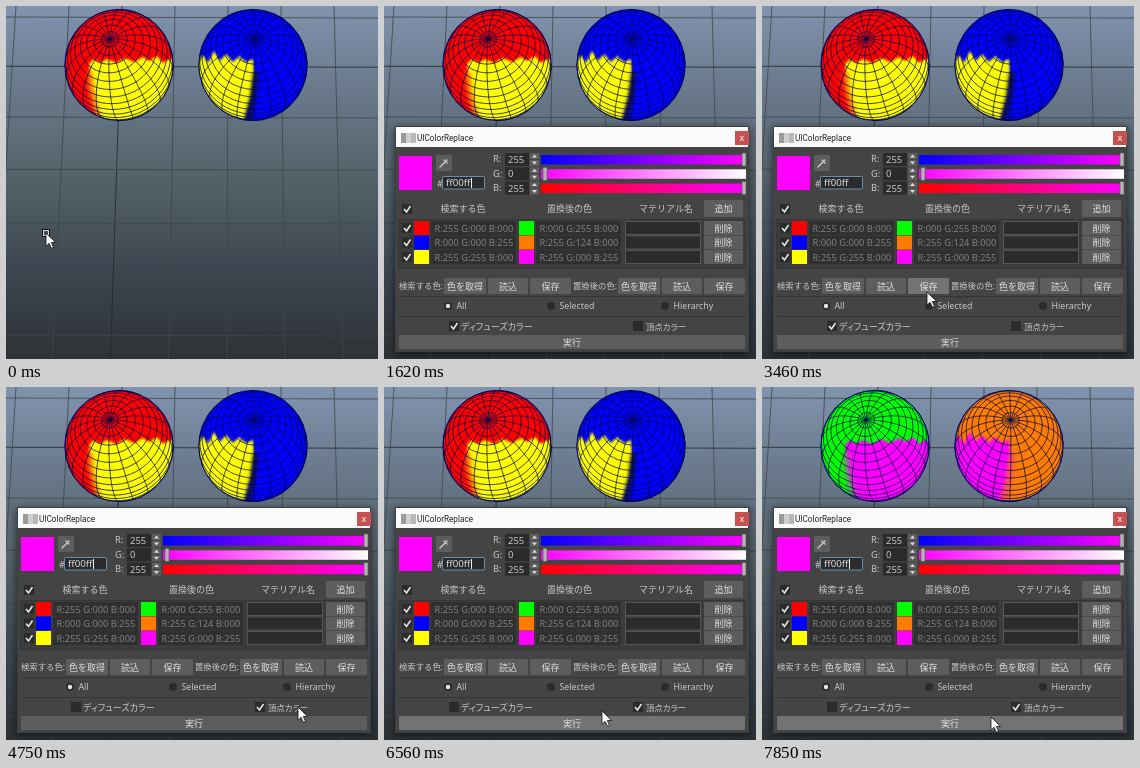
These frames come from a looping animation (372x353 px, 8 s). An HTML page:

```html
<!DOCTYPE html>
<html lang="ja">
<head>
<meta charset="utf-8">
<title>UIColorReplace</title>
<style>
html, body { margin: 0; width: 100%; height: 100%; overflow: hidden; background: #2d3235; }
svg { display: block; width: 372px; height: 353px; }
text { font-family: "Noto Sans", "Noto Sans CJK JP", "Noto Sans CJK", sans-serif; white-space: pre; }
.kana { font-feature-settings: "palt"; }
</style>
</head>
<body>
<svg id="stage" viewBox="0 0 372 353" xmlns="http://www.w3.org/2000/svg"></svg>
<script>
const LOOP = 8000;
const rect = (x, y, w, h, fill, more = '') =>
  `<rect x="${x}" y="${y}" width="${w}" height="${h}" fill="${fill}" ${more}/>`;
const text = (x, y, str, size = 9, fill = '#c8c8c8', more = '') =>
  `<text x="${x}" y="${y}" font-size="${size}" fill="${fill}" ${more}>${str}</text>`;
const path = (d, more) => `<path d="${d}" ${more}/>`;
const line = (x1, y1, x2, y2, stroke) => path(`M${x1} ${y1}L${x2} ${y2}`, `stroke="${stroke}" fill="none"`);
const range = n => [...Array(n).keys()];

const gradient = (id, stops, vertical) =>
  `<linearGradient id="${id}" x2="${vertical ? 0 : 1}" y2="${vertical ? 1 : 0}">` +
  stops.map(([o, c]) => `<stop offset="${o}" stop-color="${c}"/>`).join('') + '</linearGradient>';
const blur = (id, amount) =>
  `<filter id="${id}" x="-50%" y="-20%" width="200%" height="140%" color-interpolation-filters="sRGB">` +
  `<feGaussianBlur stdDeviation="${amount}"/></filter>`;

function viewport() {
  const shade = (i, axis) => i === axis ? '#23262b' : '#41454a';
  const columns = range(7).map(i => line(10 + 53 * i, 0, -12 + 58.2 * i, 353, shade(i, 2)));
  const rows = range(7).map(i => {
    const y = 11 + 48.5 * i + .75 * i * i;
    return line(0, y, 372, y + 1, shade(i, 1));
  });
  return rect(0, 0, 372, 353, 'url(#sky)') + `<g opacity=".8">${columns.join('') + rows.join('')}</g>`;
}

// Latitude and longitude lines of the near half, tilted so the pole sits at (ax, ay).
function wireframe(cx, cy, ax, ay) {
  const az = Math.sqrt(1 - ax * ax - ay * ay), m = Math.hypot(ax, az);
  const u = [az / m, 0, -ax / m];
  const v = [-ax * ay / m, m, -ay * az / m];
  const trace = at => {
    let d = '', pen = 'M';
    for (let i = 0; i <= 60; i++) {
      const [lat, lon] = at(i / 60);
      const s = Math.sin(lat), p = s * Math.cos(lon), q = s * Math.sin(lon), c = Math.cos(lat);
      if (p * u[2] + q * v[2] + c * az < 0) { pen = 'M'; continue; }
      const x = cx + 54.2 * (p * u[0] + q * v[0] + c * ax);
      const y = cy - 55.6 * (p * u[1] + q * v[1] + c * ay);
      d += pen + x.toFixed(1) + ' ' + y.toFixed(1);
      pen = 'L';
    }
    return d;
  };
  const step = Math.PI / 20;
  return range(19).map(i => trace(k => [(i + 1) * step, k * 2 * Math.PI])).join('') +
    range(20).map(i => trace(k => [k * Math.PI, i * 2 * step])).join('');
}

function sphere(name, cx, ax, base, patch, seam, blend) {
  const shape = `cx="${cx}" cy="59" rx="54.2" ry="55.6"`;
  return `<clipPath id="${name}Clip"><ellipse ${shape}/></clipPath>
    <g clip-path="url(#${name}Clip)">
      <ellipse id="${name}Base" ${shape} fill="${base}"/>
      ${path(patch, 'class="patch" fill="#ff0" filter="url(#soft)"')}
      ${path(seam, `id="${name}Seam" fill="none" stroke="${blend}" stroke-width="5" filter="url(#wide)"`)}
    </g>` +
    path(wireframe(cx, 59, ax, .468), 'fill="none" stroke="#00084a" stroke-width=".75"') +
    `<ellipse ${shape} fill="none" stroke="#000868"/>`;
}

const check = (x, y, id, on = true) => rect(x, y, 10, 10, '#2b2b2b') +
  path(`M${x + 2} ${y + 5}l2.5 3l4 -6`,
    `${id ? `id="${id}"` : ''} fill="none" stroke="#e6e6e6" stroke-width="1.6" opacity="${on ? 1 : 0}"`);

const button = (x, y, w, h, label, id = '') => rect(x, y, w, h, '#5d5d5d', `rx="1" ${id && `id="${id}"`}`) +
  text(x + w / 2, y + h / 2 + 3.5, label, 9, '#e0e0e0', 'text-anchor="middle"');

function channel(y, label, value, knob) {
  return text(109, y + 9.3, label, 9.3) + rect(121, y, 24, 13, '#2b2b2b') + text(124, y + 10, value, 9.5) +
    rect(146, y, 9, 6, '#5d5d5d') + rect(146, y + 7, 9, 6, '#5d5d5d') +
    path(`M148 ${y + 4.5}l2.5 -3l2.5 3zM148 ${y + 8.5}l2.5 3l2.5 -3z`, 'fill="#ddd"') +
    rect(157, y + 2, 205, 9.5, `url(#ch${label[0]})`) +
    rect(knob, y, 4, 13, '#b4b4b4', 'stroke="#555" stroke-width=".6"');
}

function colorRow(y, from, fromText, to, toText) {
  const cell = (x, str) => rect(x, y, 85, 14, '#303030') + text(x + 3.5, y + 10.5, str, 9.3, '#808080');
  return check(18, y + 2) + rect(30, y, 15, 14, from) + cell(47, fromText) +
    rect(135, y, 15, 14, to) + cell(152, toText) +
    rect(241.5, y + .5, 75, 13, '#2b2b2b', 'stroke="#555"') + button(320, y, 39, 14, '削除');
}

const radio = (x, label, on) => `<circle cx="${x}" cy="300" r="4" fill="#2b2b2b"/>` +
  (on ? `<circle cx="${x}" cy="300" r="2.2" fill="#e6e6e6"/>` : '') + text(x + 8.5, 303.2, label, 8.8);

const fileButtons = (x, id) => button(x, 272, 42, 16, '色を取得') +
  button(x + 44, 272, 40, 16, '読込') + button(x + 86, 272, 41, 16, '保存', id);

function dialog() {
  const mosaic = range(6).map(i =>
    rect(17 + i % 3 * 5, 127 + (i > 2) * 5, 5, 5, ['#9a9a9a', '#b8b8b8', '#cfcfcf'][i * 2 % 3])).join('');
  return rect(10, 121, 356, 228, '#000', 'opacity=".5" filter="url(#shadow)"') +
    rect(11.5, 120.5, 353, 225, '#444', 'stroke="#3a3f44"') +
    rect(12, 121, 352, 20, '#fbfbfb') + mosaic +
    text(33, 135, 'UIColorReplace', 8.2, '#222', 'style="font-family:Roboto,sans-serif"') +
    rect(351, 125, 14, 14, '#c75050') + text(358, 135, 'x', 9, '#fff', 'text-anchor="middle"') +
    rect(15, 150, 33, 34, '#f0f') +
    rect(52, 149, 16, 16, '#5d5d5d', 'rx="1"') +
    path('M56 161l5 -5M60 154l3 3M62 155l1 -1', 'stroke="#c4c4c4" stroke-width="1.5" stroke-linecap="round"') +
    text(53, 181, '#', 9) +
    rect(58.5, 170.5, 42, 12.5, '#2b2b2b', 'stroke="#6a8fac" rx="1"') + text(62, 180.3, 'ff00ff', 9.7, '#ddd') +
    rect(87, 172, 1, 10, '#eee', 'id="caret"') +
    channel(147, 'R:', '255', 358) + channel(161.3, 'G:', '0', 159) + channel(175.6, 'B:', '255', 358) +
    check(18, 198) + text(56.5, 206, '検索する色') + text(163, 206, '置換後の色') + text(255, 206, 'マテリアル名') +
    button(320, 194, 39, 17, '追加') +
    rect(14.5, 213.5, 347, 49, '#3c3c3c', 'stroke="#363636"') +
    colorRow(215, '#f00', 'R:255 G:000 B:000', '#0f0', 'R:000 G:255 B:000') +
    colorRow(229.5, '#00f', 'R:000 G:000 B:255', '#ff7c00', 'R:255 G:124 B:000') +
    colorRow(244, '#ff0', 'R:255 G:255 B:000', '#f0f', 'R:255 G:000 B:255') +
    text(15, 283.3, '検索する色:', 8.4) + fileButtons(60, 'save') +
    text(189, 283.3, '置換後の色:', 8.4) + fileButtons(234, '') +
    line(15, 290.5, 361, 290.5, '#363636') + line(15, 310.5, 361, 310.5, '#363636') +
    radio(64, 'All', true) + radio(167, 'Selected') + radio(281, 'Hierarchy') +
    check(65, 315, 'diffuse') + text(77, 323.5, 'ディフューズカラー', 9, '#c8c8c8', 'class="kana"') +
    check(249, 315, 'vertex', false) + text(262, 323.5, '頂点カラー', 8.4, '#c8c8c8', 'class="kana"') +
    button(15, 329, 346, 14, '実行', 'run');
}

const arrow = path('M0 0V13.2L3.1 10.3L5.4 15.3L7.5 14.3L5.3 9.5H9.6Z',
  'fill="#fff" stroke="#111" stroke-width=".8"');

const stage = document.getElementById('stage');
stage.innerHTML = '<defs>' +
  gradient('sky', [[0, '#8194ae'], [.2, '#6d7d91'], [.5, '#536167'], [.75, '#3d4650'], [1, '#2d3235']], true) +
  gradient('chR', [[0, '#00f'], [1, '#f0f']]) + gradient('chG', [[0, '#f0f'], [1, '#fff']]) +
  gradient('chB', [[0, '#f00'], [1, '#f0f']]) +
  blur('soft', 1) + blur('wide', 2) + blur('shadow', 4) + '</defs>' +
  viewport() +
  sphere('left', 113, -.165, '#f00',
    'M83 58L88 53L94 57L101 53L110 57L119 52L128 56L137 51L143 55L151 50L157 57L163 53L172 55V120H95L89 100L85 82L84 68Z',
    'M84 66L85 82L89 100L95 120', '#ff8000') +
  sphere('right', 247, .03, '#00f',
    'M188 56L197 49L202 57L208 45L214 55L220 48L227 56L233 50L240 56L247 53L248 68L245 90L237 120H188Z',
    'M250 66L247 90L240 120', '#14141c') +
  `<g id="dialog">${dialog()}</g>
  <g id="pick"><g transform="translate(40 227)">
    ${rect(-3.5, -3.5, 7, 7, 'none', 'stroke="#111"')}
    ${rect(-2.5, -2.5, 5, 5, 'none', 'stroke="#ddd"')}${arrow}</g></g>
  <g id="pointer"><g id="pointerPos">${arrow}</g></g>`;

// Each step holds its value until the next one.
function play(target, prop, steps) {
  const frames = steps.map(([t, v]) => ({ offset: t / LOOP, [prop]: v, easing: 'steps(1, end)' }));
  frames.push({ offset: 1, [prop]: steps[steps.length - 1][1] });
  for (const el of document.querySelectorAll(target)) el.animate(frames, { duration: LOOP, iterations: Infinity });
}

const REST = '#5d5d5d', HOVER = '#737373', PRESSED = '#1e1e1e', DONE = 7730;
play('#pick', 'opacity', [[0, 1], [120, 0]]);
play('#dialog', 'opacity', [[0, 0], [1620, 1]]);
play('#pointer', 'opacity', [[0, 0], [2180, 1]]);
play('#pointerPos', 'transform', [
  [0, 310, 170], [2330, 304, 160], [2480, 296, 150], [2640, 284, 141], [2790, 270, 134], [2940, 261, 131],
  [3340, 200, 235], [3460, 165, 286], [3610, 150, 298], [3760, 120, 309], [3910, 92, 316], [4060, 74, 318],
  [4210, 69, 319], [4450, 190, 319], [4600, 286, 319], [4750, 292, 320], [4870, 285, 324], [5000, 265, 329],
  [5130, 245, 331], [5270, 232, 331], [5410, 227, 331], [6260, 223, 329], [6400, 220, 326], [6560, 218, 324],
  [6960, 221, 326], [7110, 225, 328], [7280, 228, 329], [7450, 229, 330]
].map(([t, x, y]) => [t, `translate(${x}px, ${y}px)`]));
play('#caret', 'opacity', [[0, 1], [2180, 0], [2790, 1], [3340, 0], [3910, 1], [5130, 0], [5840, 1]]);
play('#save', 'fill', [[0, REST], [3460, HOVER], [3610, REST]]);
play('#diffuse', 'opacity', [[0, 1], [4330, 0]]);
play('#vertex', 'opacity', [[0, 0], [4750, 1]]);
play('#run', 'fill', [[0, REST], [5000, HOVER], [5840, PRESSED], [6110, HOVER]]);
play('#leftBase', 'fill', [[0, '#f00'], [DONE, '#0f0']]);
play('#leftSeam', 'stroke', [[0, '#ff8000'], [DONE, '#808080']]);
play('#rightBase', 'fill', [[0, '#00f'], [DONE, '#ff7c00']]);
play('#rightSeam', 'stroke', [[0, '#14141c'], [DONE, '#ff4080']]);
play('.patch', 'fill', [[0, '#ff0'], [DONE, '#f0f']]);
</script>
</body>
</html>
```
